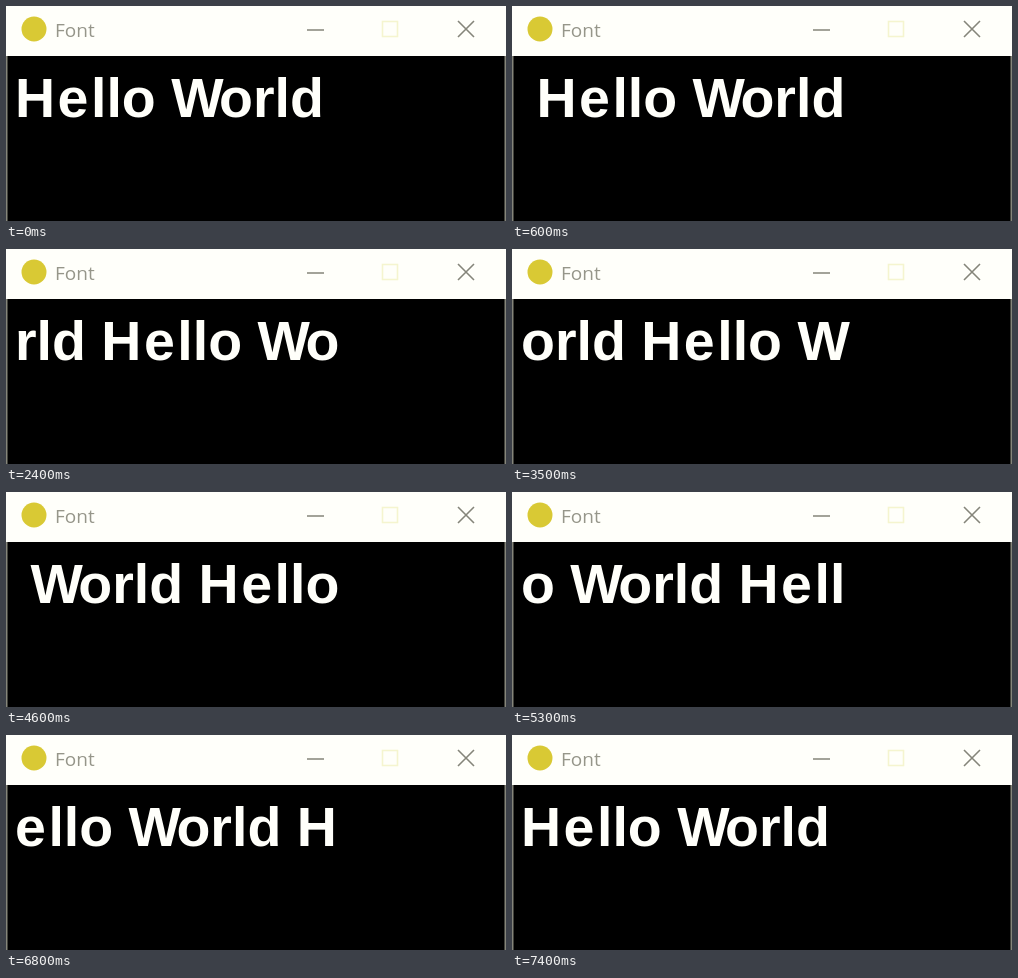
These frames come from a looping animation (500 px wide and 215 px high, 8000 ms). An HTML page:

```html
<!DOCTYPE html>
<html lang="en">
<head>
<meta charset="utf-8">
<title>Font</title>
<style>
  html, body { margin: 0; width: 100%; height: 100%; overflow: hidden; background: #000; }
  svg { position: absolute; left: 0; top: 0; width: 500px; height: 215px; }
  .caption { font: 19px "Open Sans", "Noto Sans", sans-serif; fill: #96968a; }
  #banner {
    position: absolute; left: 9px; top: 61px; white-space: pre; color: #fffffa;
    font: bold 55.5px/62px "Liberation Sans", Arial, sans-serif;
  }
  .H, .e { letter-spacing: 2.5px; }
  .W { letter-spacing: -4.5px; }
</style>
</head>
<body>
<svg viewBox="0 0 500 215">
  <rect width="500" height="50" fill="#fffffa"/>
  <path d="M.75 50V215M499.25 50V215" stroke="#85857a" stroke-width="1.5"/>
  <circle cx="28" cy="23" r="12.5" fill="#d9c934"/>
  <text class="caption" x="49" y="31">Font</text>
  <g fill="none" stroke="#85857a" stroke-width="1.6">
    <path d="M301 24H318M452 15L468 31M468 15L452 31"/>
    <rect x="376.5" y="15.5" width="15" height="15" stroke="#f5f5cf"/>
  </g>
</svg>
<div id="banner"></div>
<script>
  const MESSAGE = "Hello World ";
  const LOOP_MS = 8000, STEP_MS = 600;
  const banner = document.getElementById("banner");
  let shown = -1;

  // Each step moves the last character to the front.
  function rotate(text, steps) {
    const cut = text.length - steps % text.length;
    return text.slice(cut) + text.slice(0, cut);
  }

  function draw(now) {
    const step = Math.min(Math.floor(now % LOOP_MS / STEP_MS), MESSAGE.length);
    if (step !== shown) {
      shown = step;
      banner.innerHTML = [...rotate(MESSAGE, step)]
        .map(c => `<span class="${c.trim()}">${c}</span>`).join("");
    }
    requestAnimationFrame(draw);
  }
  draw(performance.now());
</script>
</body>
</html>
```
